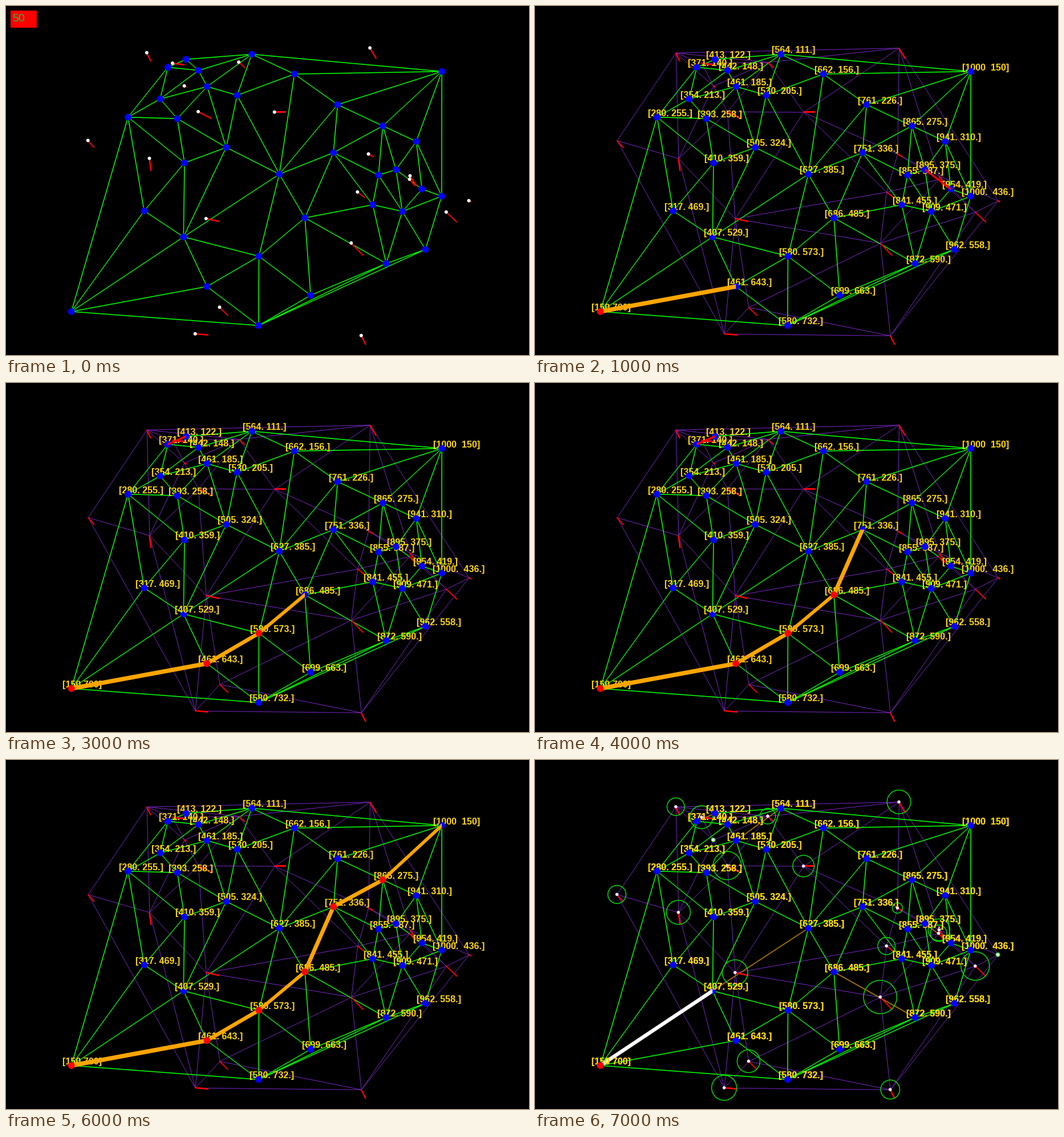
These frames come from a looping animation (917x611 px, 8 s). A matplotlib script:

```python
import numpy as np
import matplotlib.pyplot as plt
from matplotlib.animation import ArtistAnimation
from matplotlib.collections import EllipseCollection, PolyCollection
from matplotlib.patches import Rectangle
from matplotlib.tri import Triangulation

W, H, DPI = 917, 611, 100
SCALE = W / 1200          # world units to pixels

# Obstacles: x, y in world units, then velocity in pixels
OBSTACLES = np.array([
    (323, 107, 7, 15), (382, 131, 21, 3), (534, 128.6, 11, 10),
    (409, 183, 4, 2), (835, 96, 11, 19), (441, 242, 23, 12),
    (616, 243, 20, 0), (188, 308, 11, 13), (329, 349, 3, 22),
    (831.6, 339, 9, 5), (927, 389, 11, 17), (926, 397, 10, 12),
    (806.4, 426, 13, 10), (1062, 446, 4, 2), (1010, 472, 19, 18),
    (459, 487, 23, 5), (792, 543, 21, 22), (490, 690, 15, 15),
    (434, 751, 23, 2), (815, 755, 8, 16)])
START, GOAL = (150, 700), (1000, 150)

# The roadmap joins the centroids of the obstacle triangles
rocks, speed = OBSTACLES[:, :2], OBSTACLES[:, 2:]
web_tri = Triangulation(*rocks.T)
nodes = np.vstack([START, rocks[web_tri.triangles].mean(axis=1), GOAL])
links = Triangulation(*nodes.T).edges


def near(x, y):
    return int(np.hypot(*(nodes - (x, y)).T).argmin())


def clearance(link):
    """Smallest distance from a link to any obstacle centre."""
    a, b = nodes[link]
    d = b - a
    t = np.clip((rocks - a) @ d / (d @ d), 0, 1)
    return np.hypot(*(a + t[:, None] * d - rocks).T).min()


route = [near(*p) for p in (START, (461, 643), (580, 573), (686, 485),
                            (751, 336), (865, 275), GOAL)]
blocked = [(near(895, 375), near(954, 419)), (near(371, 140), near(413, 122))]
retry = near(407, 529)
grazing = [link for link in links if clearance(link) < 7.5]

pos, rock_pos = nodes * SCALE, rocks * SCALE

fig = plt.figure(figsize=(W / DPI, H / DPI), dpi=DPI, facecolor="black")
ax = fig.add_axes([0, 0, 1, 1])
ax.set_xlim(0, W)
ax.set_ylim(H, 0)
ax.axis("off")


def bar(a, b, width):
    """Thick line whose ends are cut along the axis it crosses."""
    flat = abs(b[0] - a[0]) >= abs(b[1] - a[1])
    off = np.array((0, width / 2) if flat else (width / 2, 0))
    return [a + off, b + off, b - off, a - off]


def bars(pairs, width, color, z):
    return ax.add_collection(PolyCollection(
        [bar(a, b, width) for a, b in pairs], facecolors=color,
        edgecolors="none", zorder=z), autolim=False)


def edges(pairs, width, color, z):
    return bars([(pos[i], pos[j]) for i, j in pairs], width, color, z)


def discs(points, radius, color, z, fill=True):
    points = np.atleast_2d(points)
    size = np.broadcast_to(2 * np.asarray(radius, float), len(points))
    return ax.add_collection(EllipseCollection(
        size, size, np.zeros(len(points)), units="xy", offsets=points,
        offset_transform=ax.transData,
        facecolors=color if fill else "none",
        edgecolors="none" if fill else color,
        linewidths=0 if fill else 1.5 * 72 / DPI, zorder=z), autolim=False)


def text(x, y, s, px, color, z, weight="normal"):
    return ax.text(x, y, s, fontsize=px * 72 / DPI, color=color, zorder=z,
                   family="Liberation Sans", weight=weight,
                   ha="left", va="baseline")


def label(i):
    x, y = np.rint(nodes[i]).astype(int)
    dot = "" if i in (route[0], route[-1]) else "."
    w = len(str(max(x, y)))
    return f"[{x:>{w}}{dot} {y:>{w}}{dot}]"


def labels(z):
    return [text(x - 15.6, y - 2.1, label(i), 16.1, "#ffd700", z, "bold")
            for i, (x, y) in enumerate(pos)]


mesh = edges(links, 1.6, "#00ff00", 2)
arrows = bars(zip(rock_pos, rock_pos + speed), 2.6, "red", 3)
dots = [discs(np.delete(pos, retry, axis=0), 5.9, "blue", 6),
        discs(pos[retry], 5.9, "blue", 4)]
web = bars(rock_pos[web_tri.edges] + 0.4, 1, "#7a28c8", 1.5)
names = labels(5)
base = [mesh, arrows, *dots]

# Opening view
stages = [base + [ax.add_patch(Rectangle((8, 8), 45.5, 30, color="red", lw=0)),
                  text(11.5, 27.2, "50", 19.5, "#2fb84a", 3),
                  discs(rock_pos, 3, "white", 3.5)]]
base += [web, *names]

# Route grows one segment per step
legs = [edges([leg], 7.7, "orange", 6.5) for leg in zip(route, route[1:])]
marks = [discs(pos[i], 5.9, "red", 8) for i in route[:-1]]
walls = [edges([pair], 3.8, "red", 7) for pair in blocked]
for k in range(1, len(route)):
    wall = walls[(k - 1) // 2:(k + 1) // 2]
    stages.append(base + wall + legs[:k] + marks[:k])

# Fresh search with the reach of each obstacle shown
reach = np.hypot(*speed.T) - 1.2
stages.append(base + labels(5.1) + [
    marks[0],
    edges(grazing, 2, "#b06000", 2.5),
    discs(rock_pos, reach, "#00e000", 3.2, fill=False),
    discs(rock_pos, 2.8, "#f4e8ff", 3.5),
    edges([(route[0], retry)], 7.7, "white", 4.5)])

anim = ArtistAnimation(fig, stages, interval=1000, repeat=True,
                       repeat_delay=0, blit=False)
plt.show()
```
